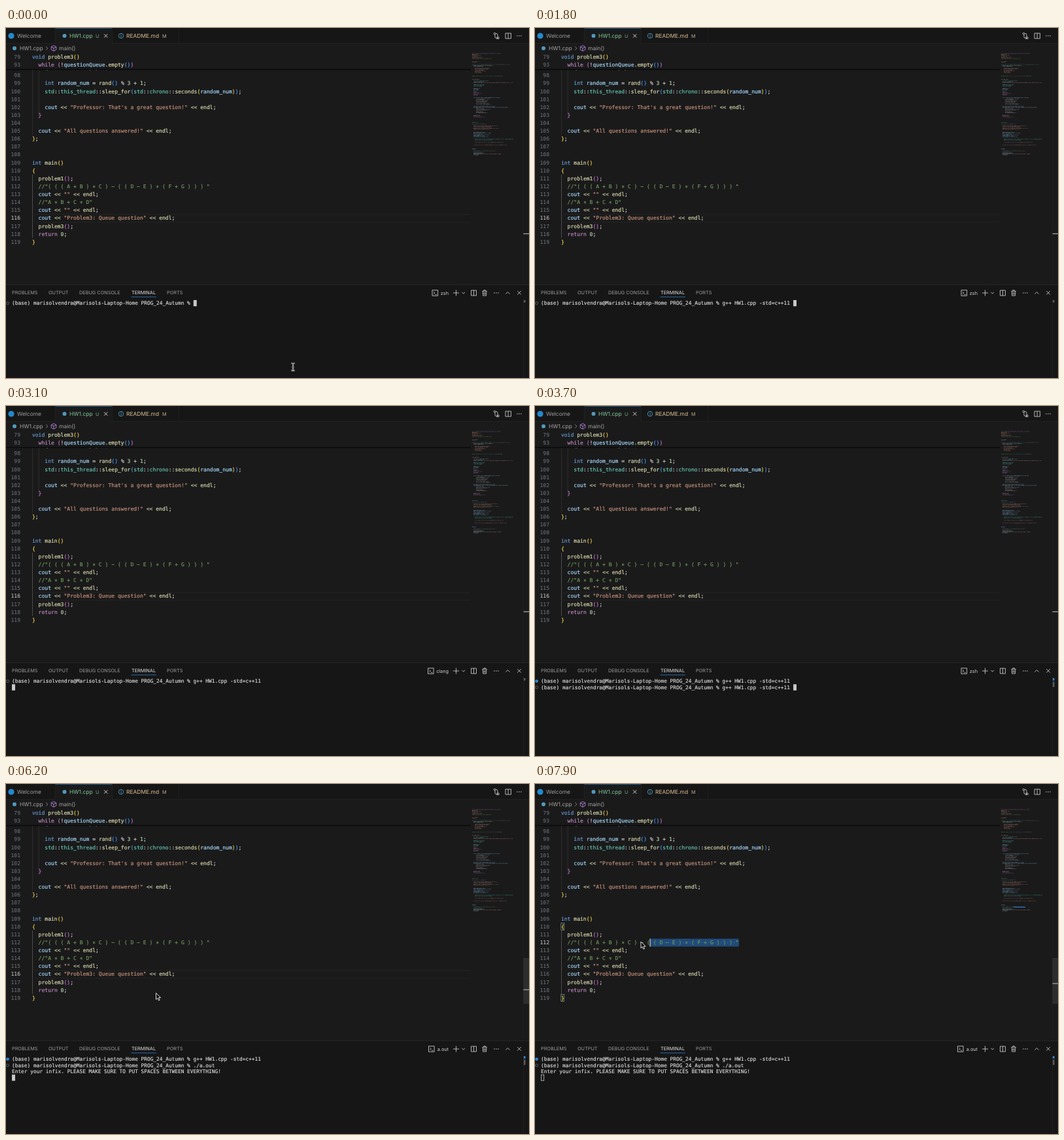
An HTML page that plays this animation: 800x535 px, repeating every 8 s.

```html
<!DOCTYPE html>
<html lang="en">
<head>
<meta charset="utf-8">
<title>Editor and terminal</title>
<style>
html, body { margin: 0; width: 100%; height: 100%; overflow: hidden; background: #1a1a1b; }
svg { display: block; width: 800px; height: 535px; }
text { white-space: pre; text-rendering: geometricPrecision; }
.code { font: 8.07px "DejaVu Sans Mono", monospace; stroke-width: .16; }
.term { font: 7.82px "DejaVu Sans Mono", monospace; fill: #e0e0e0; stroke: #e0e0e0; stroke-width: .14; }
.ui { font: 8.45px Inter, "Open Sans", sans-serif; }
.cap { font: 7.3px Inter, "Open Sans", sans-serif; }
.icon { fill: none; stroke: #c4c4c4; stroke-width: .9; }
</style>
</head>
<body>
<svg id="stage" viewBox="0 0 800 535"></svg>
<script>
const stage = document.getElementById('stage');
const LOOP = 8000, STEP = 100;
const CW = 4.858, LH = 12.12, LEFT = 39.9;   // code grid
const TW = 4.708, TH = 9.45, TX = 9;         // terminal grid

const col = n => LEFT + n * CW;
const base = n => 208.6 + (n - 109) * LH;
const row = n => 423.3 + n * TH;
const esc = s => s.replace(/&/g, '&amp;').replace(/</g, '&lt;');

const rect = (x, y, w, h, fill, more = '') =>
  `<rect x="${x}" y="${y}" width="${w}" height="${h}" fill="${fill}" ${more}/>`;
const dot = (x, y, r, fill, more = '') =>
  `<circle cx="${x}" cy="${y}" r="${r}" fill="${fill}" ${more}/>`;
const text = (x, y, s, cls, fill, more = '') =>
  `<text x="${x}" y="${y}" class="${cls}" ${fill ? `fill="${fill}"` : ''} ${more}>${s}</text>`;
const icon = (d, more = '') => `<path class="icon" d="${d}" ${more}/>`;
const dots = (x, y) => [-3, 0, 3].map(k => dot(x + k, y, .75, '#c4c4c4')).join('');

// Syntax colours
const BRACKETS = ['#f9d849', '#ca76d2', '#4b9df8'];
const RULES = [
  [/^\/\/.*/, '#72985c'],
  [/^"[^"]*"/, '#c8937a'],
  [/^(while|return)\b/, '#bc89bd'],
  [/^(void|int)\b/, '#679bd1'],
  [/^(endl\b|<<)/, '#dcdcaf'],
  [/^\w+(?=::)/, '#67c7b0'],
  [/^\w+(?=\()/, '#dcdcaf'],
  [/^\d+/, '#bacdab'],
  [/^[a-z]\w*/i, '#a8dbfb'],
  [/^[^\w"(){}]/, '#d4d4d4']
];
let depth = 0;

function token(s) {
  if ('({'.includes(s[0])) return [s[0], BRACKETS[depth++ % 3]];
  if (')}'.includes(s[0])) return [s[0], BRACKETS[--depth % 3]];
  for (const [re, color] of RULES) {
    const m = s.match(re);
    if (m) return [m[0], color];
  }
}

// The editor face centres its operators on the line
const centred = s => s.replace(/\*/g, '∗').replace(/-/g, '−');

function paint(s) {
  let out = '';
  while (s) {
    const [word, color] = token(s);
    out += `<tspan fill="${color}" stroke="${color}">${esc(centred(word))}</tspan>`;
    s = s.slice(word.length);
  }
  return out;
}

const EXPR = '  //"( ( ( A + B ) * C ) - ( ( D - E ) * ( F + G ) ) ) "';
const LINES = [
  '    questionQueue.pop();',
  '',
  '    int random_num = rand() % 3 + 1;',
  '    std::this_thread::sleep_for(std::chrono::seconds(random_num));',
  '',
  '    cout << "Professor: That\'s a great question!" << endl;',
  '  }',
  '',
  '  cout << "All questions answered!" << endl;',
  '};',
  '',
  '',
  'int main()',
  '{',
  '  problem1();',
  EXPR,
  '  cout << "" << endl;',
  '  //"A * B + C * D"',
  '  cout << "" << endl;',
  '  cout << "Problem3: Queue question" << endl;',
  '  problem3();',
  '  return 0;',
  '}'
];

const number = (n, y) => text(22, y, n, 'code', '#6e7681', `text-anchor="end" id="n${n}"`);

function editor() {
  let s = '';
  const guide = (x, a, b, c) => rect(x, a, .8, b - a, c);
  s += guide(40, 64, 163.5, '#323234') + guide(49.7, 64, 139, '#323234');
  s += guide(40, 224, 321, '#5a5a5c');
  s += `<g id="current">${rect(40, 284.6, 671, .8, '#272729')}${rect(40, 296.5, 671, .8, '#272729')}</g>`;
  s += '<g id="picked"></g>';
  depth = 2;
  LINES.forEach((line, i) => {
    const n = 97 + i;
    s += text(LEFT, base(n), paint(line), 'code');
    if (n > 97) s += number(n, base(n));
  });
  s += '<g id="marks"></g>';
  // Sticky header
  s += rect(0, 37, 711, 26.4, '#1a1a1b') + rect(0, 62.6, 711, 1.6, '#0a0a0b');
  depth = 0;
  s += number(79, 47.4) + text(LEFT, 47.4, paint('void problem3()'), 'code');
  depth = 1;
  s += number(93, 59.3) + text(LEFT, 59.3, paint('  while (!questionQueue.empty())'), 'code');
  return s;
}

// Minimap blocks: top, rows, indent, width, colour
const MAP = [
  [38.6, 1, 0, 44, '#c586c0'], [40, 5, 0, 18, '#ce9178'], [46.5, 1, 0, 30, '#6a9955'],
  [51, 2, 0, 14, '#ce9178'], [55.5, 1, 0, 59, '#6a9955'], [57, 2, 2, 32, '#9cdcfe'],
  [61, 6, 4, 24, '#ce9178'], [73, 1, 0, 47, '#6a9955'], [78, 1, 0, 11, '#dcdcaa'],
  [80.5, 2, 2, 24, '#9cdcfe'], [83, 1, 2, 60, '#ce9178'], [86, 3, 2, 20, '#4ec9b0'],
  [92, 3, 2, 16, '#9cdcfe'], [97, 5, 2, 15, '#c586c0'], [106, 1, 2, 40, '#9cdcfe'],
  [108, 7, 6, 22, '#b8b8b8'], [119.5, 2, 2, 58, '#9cdcfe'], [122.5, 6, 6, 22, '#b8b8b8'],
  [133, 3, 2, 18, '#c586c0'], [144, 1, 0, 9, '#6a9955'], [146.5, 1, 0, 22, '#569cd6'],
  [149, 5, 2, 44, '#ce9178'], [159, 6, 2, 30, '#9cdcfe'], [169.5, 2, 4, 60, '#4ec9b0'],
  [174.5, 1, 4, 44, '#ce9178'], [178.5, 1, 2, 52, '#ce9178'], [184, 2, 0, 8, '#569cd6'],
  [187.5, 1, 2, 35, '#6a9955'], [189.5, 4, 2, 19, '#9cdcfe'], [192, 1, 2, 43, '#ce9178']
];

function minimap() {
  let seed = 7, s = '<g opacity=".46">';
  const rnd = () => (seed = seed * 16807 % 2147483647) / 2147483647;
  for (const [top, rows, indent, width, color] of MAP)
    for (let r = 0; r < rows; r++) {
      const end = indent + width * (rows > 1 ? .4 + rnd() * .6 : 1);
      for (let x = indent; x < end;) {
        const w = Math.min(1.5 + rnd() * 4, end - x);
        s += rect(713 + x, top + r * 1.34, w, .8, color, `opacity="${.5 + rnd() / 2}"`);
        x += w + .7;
      }
    }
  return s + '</g>' + rect(732, 187.4, 18, 1.5, '#2a6bb0', 'id="mapPick"');
}

function topBar() {
  return rect(0, 0, 800, 23.5, '#161617') + rect(0, 23, 800, .7, '#252526') +
    rect(75, 0, 87, 24, '#1a1a1b') + rect(75, 0, 87, .8, '#1b64a6') +
    [75, 162, 264].map(x => rect(x, 0, .7, 23.5, '#252526')).join('') +
    dot(8, 12, 4.6, '#2489ca') + text(17, 15, 'Welcome', 'ui', '#9b9b9b') +
    dot(89.5, 12, 3, '#519aba') + text(97, 15, 'HW1.cpp', 'ui', '#7fc796') +
    text(137, 14.8, 'U', 'cap', '#6aa97f') +
    icon('M150 9.3l5.4 5.4m0-5.4l-5.4 5.4', 'style="stroke:#e0e0e0"') +
    dot(176, 12, 3.7, 'none', 'stroke="#519aba" stroke-width=".9"') +
    rect(175.5, 11.4, 1, 2.8, '#519aba') + rect(175.5, 9.7, 1, 1, '#519aba') +
    text(184, 15, 'README.md', 'ui', '#dcc092') + text(239, 14.8, 'M', 'cap', '#c4ab80', 'font-weight="600"') +
    // actions
    icon('M748 9.5v4q0 2 2 2h2m-1.5-1.8l1.8 1.8l-1.8 1.8M752 14.5v-4q0-2-2-2h-1') +
    dot(747.5, 8.6, 1.4, 'none', 'class="icon"') + dot(753, 15.2, 1.4, 'none', 'class="icon"') +
    icon('M764 8h8.5v8h-8.5zM768.2 8v8') + dots(785, 12) +
    // breadcrumbs
    dot(13, 31, 3, '#519aba') + text(21, 34, 'HW1.cpp', 'ui', '#a4a4a4') +
    icon('M61.2 28.2l2.7 2.8l-2.7 2.8', 'style="stroke:#858585"') +
    icon('M73 26.8l3.8 2v4.4l-3.8 2l-3.8-2v-4.4zM69.2 28.8l3.8 2l3.8-2M73 30.8v4.4', 'style="stroke:#b180d7"') +
    text(81, 34, 'main()', 'ui', '#a4a4a4');
}

function panel() {
  const tab = (x, s, on) => text(x, 407.2, s, 'cap', on ? '#e6e6e6' : '#9b9b9b');
  return rect(0, 392, 800, 143, '#161617') + rect(0, 392, 800, .8, '#29292a') +
    tab(9, 'PROBLEMS') + tab(65, 'OUTPUT') + tab(112, 'DEBUG CONSOLE') +
    tab(192, 'TERMINAL', true) + tab(246, 'PORTS') + rect(191.5, 410.6, 38.5, .9, '#2a75bb') +
    `<g id="shell">${icon('M.5 400.7h8.6v8.6h-8.6zM2.4 403l2 2l-2 2M5 407.4h2.4')}</g>` +
    text(677, 407.6, '', 'cap', '#d0d0d0', 'id="shellName" text-anchor="end"') +
    icon('M684 405h9M688.5 400.5v9M697.4 403.8l2.3 2.3l2.3-2.3') +
    icon('M711.5 401h8v8h-8zM715.5 401v8') +
    icon('M728.4 402.3h7.4M729.3 402.5l.4 6.6h4.8l.4-6.6M730.8 402v-1.3h2.6v1.3M731.2 404v3.6M733 404v3.6') +
    dots(750, 405) + icon('M764.4 406.6l3.1-3.1l3.1 3.1M782.3 402l5.6 5.6m0-5.6l-5.6 5.6') +
    rect(791.3, 414, .7, 121, '#272728') + '<g id="term"></g>';
}

const BEAM = 'M-2.6-5.5q2.6 0 2.6 1.6v7.8q0 1.6-2.6 1.6M2.6-5.5q-2.6 0-2.6 1.6' +
  'M2.6 5.5q-2.6 0-2.6-1.6M-1.6.8h3.2';

stage.innerHTML = rect(0, 0, 800, 535, '#1a1a1b') + editor() + topBar() + minimap() +
  rect(791.3, 37, .7, 355, '#232324') +
  rect(791.5, 266, 8.5, 70, '#7a7a7a', 'id="slider" opacity=".2"') +
  rect(791.5, 313.8, 8.5, 1.4, '#9a9a9a', 'id="ruler"') + panel() +
  `<g id="beam" transform="translate(439 518)" fill="none">
    <path d="${BEAM}" stroke="#eee" stroke-width="2"/>
    <path d="${BEAM}" stroke="#222" stroke-width=".8"/></g>
  <path id="arrow" d="M0 0v9.8l2.3-2.1l1.6 3.7l1.7-.7l-1.6-3.6h3.1z" fill="#080808" stroke="#f2f2f2" stroke-width=".9"/>`;

const el = id => document.getElementById(id);
const show = (id, on) => el(id).style.display = on ? '' : 'none';

// Terminal steps: start, lines, program, finished commands
const PROMPT = '(base) marisolvendra@Marisols-Laptop-Home PROG_24_Autumn % ';
const BUILD = PROMPT + 'g++ HW1.cpp -std=c++11 ', RUN = PROMPT + './a.out ';
const ASK = 'Enter your infix. PLEASE MAKE SURE TO PUT SPACES BETWEEN EVERYTHING!';
const STEPS = [
  [0, [PROMPT], 'zsh', 0],
  [800, [RUN], 'zsh', 0],
  [1200, [BUILD], 'zsh', 0],
  [2400, [BUILD, ''], 'clang', 0],
  [3200, [BUILD, PROMPT], 'zsh', 1],
  [3600, [BUILD, BUILD], 'zsh', 1],
  [4000, [BUILD, RUN], 'zsh', 1],
  [4500, [BUILD, RUN, ASK, ''], 'a.out', 1]
];
const ICON_X = { zsh: 651.5, clang: 645, 'a.out': 646 };

// Pointer path: time, x, y
const PATH = [
  [6200, 229.5, 319.5], [6500, 285, 266], [6800, 313, 243],
  [7000, 313, 243], [7900, 162, 241], [8000, 146, 241]
];
const SHOW = 6200, PRESS = 6900, LAG = 70;

function pointer(t) {
  const i = Math.max(1, PATH.findIndex(p => p[0] >= t));
  const [a, b] = [PATH[i - 1], PATH[i]];
  const k = Math.max(0, (t - a[0]) / (b[0] - a[0]));
  return [a[1] + (b[1] - a[1]) * k, a[2] + (b[2] - a[2]) * k];
}

function drawTerm(t, focus) {
  const [, lines, name, done] = STEPS.filter(s => s[0] <= t).pop();
  el('shell').setAttribute('transform', `translate(${ICON_X[name]} 0)`);
  el('shellName').textContent = name;
  let s = lines.map((line, i) => text(TX, row(i), esc(line), 'term')).join('');
  if (done) s += dot(2.6, row(0) - 2.7, 2.4, '#2d86d0');
  s += dot(2.6, row(done) - 2.7, 2, 'none', 'stroke="#6a6a6c" stroke-width=".8"');
  const x = TX + lines[lines.length - 1].length * TW, y = row(lines.length - 1) - 7.4;
  s += focus ? rect(x, y, 5, 9.4, '#c8c8c8')
    : rect(x + .4, y + .4, 4.3, 8.6, 'none', 'stroke="#c8c8c8" stroke-width=".8"');
  s += rect(792, 416, 2.6, 3.6, done ? '#2d86d0' : '#58585a');
  if (done) s += rect(792, 421.5, 2.6, 8, '#58585a');
  el('term').innerHTML = s;
}

function drawPick(t, on) {
  show('current', !on);
  el('n116').setAttribute('fill', on ? '#6e7681' : '#d0d0d0');
  el('n112').setAttribute('fill', on ? '#d0d0d0' : '#6e7681');
  el('ruler').setAttribute('y', on ? 304.3 : 313.8);
  let back = '', front = '', caret = EXPR.length;
  if (on) {
    const y = base(112) - 8.5;
    caret = Math.min(caret, Math.round((pointer(t - LAG)[0] - LEFT) / CW));
    back = rect(col(caret), y, (EXPR.length - caret) * CW, LH, '#204a78', 'rx="1.5"');
    const spaces = EXPR.slice(caret).replace(/[^ ]/g, '_').replace(/ /g, '·').replace(/_/g, ' ');
    front = text(col(caret), base(112), spaces, 'code', '#547190') +
      rect(col(caret) - .4, y, 1.1, LH, '#d8d8d8');
    for (const n of [110, 119])
      back += rect(39.8, base(n) - 8.2, 5, 10.8, '#1b271e', 'stroke="#888" stroke-width=".7"');
  }
  el('picked').innerHTML = back;
  el('marks').innerHTML = front;
  el('mapPick').setAttribute('width', (EXPR.length - caret) * .65);
  el('mapPick').setAttribute('x', 713 + caret * .67);
}

function draw(t) {
  const pressed = t >= PRESS;
  drawTerm(t, !pressed);
  drawPick(t, pressed);
  show('beam', t < 400);
  show('arrow', t >= SHOW);
  show('slider', t >= SHOW);
  const [x, y] = pointer(t);
  el('arrow').setAttribute('transform', `translate(${x} ${y})`);
}

let last = -1;
function tick() {
  const t = Math.floor(performance.now() % LOOP / STEP) * STEP;
  if (t !== last) draw(last = t);
  requestAnimationFrame(tick);
}
tick();
</script>
</body>
</html>
```
